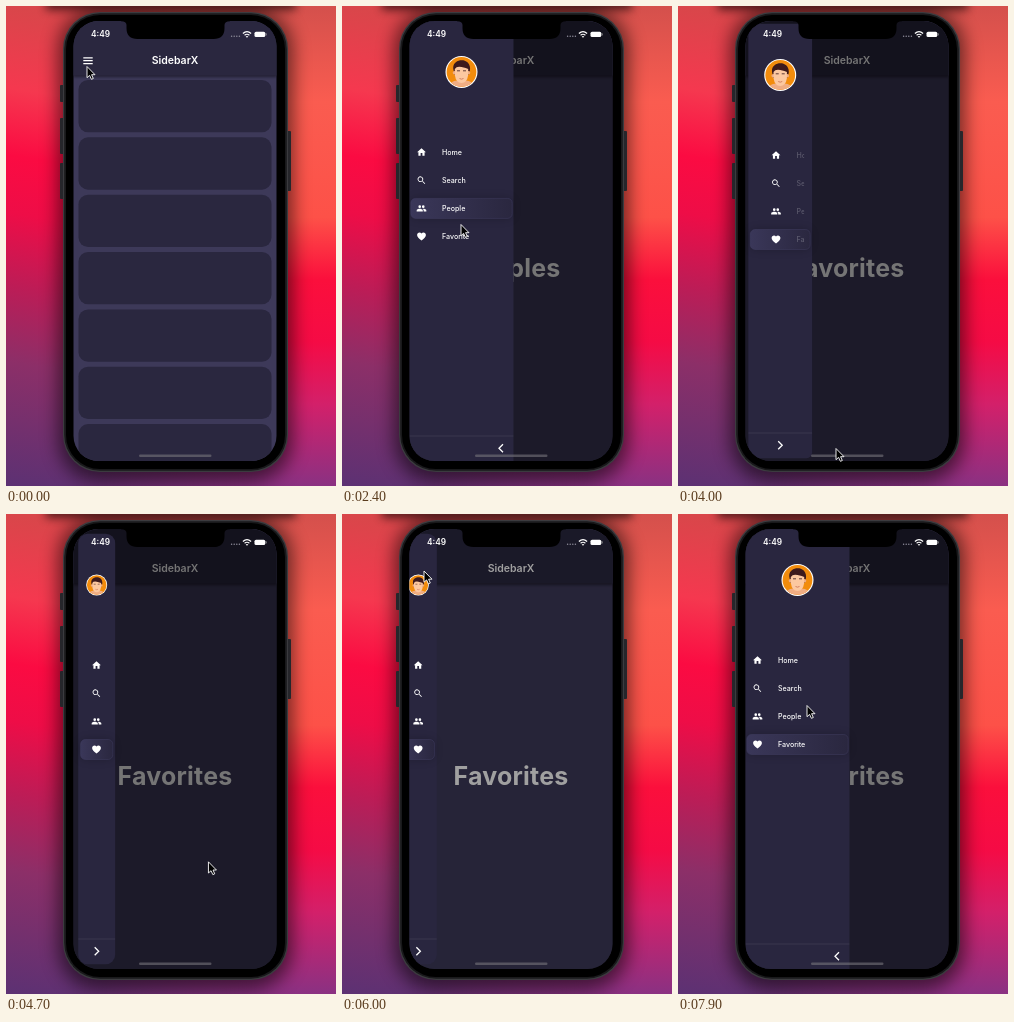
Animation, 330 px wide and 480 px high, one loop 8 s. Source, as an HTML page:

```html
<!DOCTYPE html>
<html lang="en">
<head>
<meta charset="utf-8">
<title>Sidebar demo</title>
<style>
html, body { margin: 0; width: 100%; height: 100%; overflow: hidden; background: #000; }
svg { display: block; width: 100vw; height: 100vh; }
text { font-family: Inter, Roboto, sans-serif; fill: #fff; }
</style>
</head>
<body>
<svg id="stage" viewBox="0 0 330 480">
  <defs>
    <linearGradient id="wallLeft" gradientUnits="userSpaceOnUse" x1="0" y1="0" x2="-70" y2="470">
      <stop offset="0" stop-color="#d9464a"/><stop offset=".17" stop-color="#f5384f"/>
      <stop offset=".31" stop-color="#fb0b42"/><stop offset=".43" stop-color="#ee0d47"/>
      <stop offset=".58" stop-color="#bd1c56"/><stop offset=".74" stop-color="#8c2f68"/>
      <stop offset="1" stop-color="#5c3173"/>
    </linearGradient>
    <linearGradient id="wallRight" x1="0" y1="0" x2="0" y2="1">
      <stop offset="0" stop-color="#d4504c"/><stop offset=".2" stop-color="#fa5c50"/>
      <stop offset=".44" stop-color="#fd5148"/><stop offset=".57" stop-color="#fb0f3c"/>
      <stop offset=".7" stop-color="#f50b45"/><stop offset=".83" stop-color="#d3206a"/>
      <stop offset="1" stop-color="#8a3182"/>
    </linearGradient>
    <linearGradient id="across"><stop offset=".2" stop-color="#000"/><stop offset=".8" stop-color="#fff"/></linearGradient>
    <mask id="rightSide"><rect width="330" height="480" fill="url(#across)"/></mask>
    <linearGradient id="selected"><stop offset="0" stop-color="#3a3759"/><stop offset="1" stop-color="#2a273f"/></linearGradient>
    <filter id="blur" x="-30%" y="-30%" width="160%" height="160%"><feGaussianBlur stdDeviation="9"/></filter>
    <filter id="soft" x="-30%" y="-100%" width="160%" height="300%"><feGaussianBlur stdDeviation="5"/></filter>
    <filter id="barBlur" x="-10%" y="-20%" width="120%" height="150%"><feGaussianBlur stdDeviation="1.5"/></filter>
    <clipPath id="screen"><rect x="67.5" y="15" width="203" height="440" rx="25"/></clipPath>
    <clipPath id="labelClip"><rect id="labelBox" x="60" y="100" height="200"/></clipPath>
    <clipPath id="face"><circle r="14.8"/></clipPath>
  </defs>

  <rect width="330" height="480" fill="url(#wallLeft)"/>
  <rect width="330" height="480" fill="url(#wallRight)" mask="url(#rightSide)"/>
  <rect x="52" y="2" width="235" height="474" rx="42" opacity=".55" filter="url(#blur)"/>
  <rect x="40" y="-14" width="250" height="18" opacity=".6" filter="url(#soft)"/>

  <g id="buttons" fill="#26262b"></g>
  <rect x="57" y="6" width="225" height="460" rx="37" fill="#3b3b3f"/>
  <rect x="58.2" y="7.2" width="222.6" height="457.6" rx="36" fill="#19191b"/>
  <rect x="60" y="9" width="219" height="454" rx="34"/>

  <g clip-path="url(#screen)">
    <rect x="67" y="15" width="204" height="441" fill="#3d3959"/>
    <g id="cards" fill="#2a273f"></g>
    <text id="page" x="169" y="271" font-size="25" font-weight="700" letter-spacing=".2" text-anchor="middle"></text>
    <rect x="67" y="20" width="204" height="51" opacity=".45" filter="url(#barBlur)"/>
    <rect x="67" y="15" width="204" height="54.5" fill="#2a273f"/>
    <path d="M77.3 51.8h9.4M77.3 54.7h9.4M77.3 57.6h9.4" stroke="#fff" stroke-width="1.2"/>
    <text x="169" y="58.4" font-size="10.5" font-weight="600" text-anchor="middle">SidebarX</text>
    <rect id="scrim" x="67" y="15" width="204" height="441"/>

    <g id="drawer">
      <rect id="panel" fill="#29263f"/>
      <g id="avatar">
        <circle r="16" fill="#fff"/>
        <circle r="14.9" fill="#f28c0c"/>
        <g clip-path="url(#face)">
          <path d="M-13 16Q-12 9-4 8.5V4H4V8.5Q12 9 13 16Z" fill="#f0ad83"/>
          <path d="M-8-2C-11-14 10-16 8.5-2L7 3H-7Z" fill="#3d1a1c"/>
          <circle cx="-7" cy=".8" r="1.8" fill="#f0ad83"/><circle cx="7" cy=".8" r="1.8" fill="#f0ad83"/>
          <path d="M-6.7-3Q-5-6 0-5T6.7-3V3Q5.5 11 0 11T-6.7 3Z" fill="#fcc8a0"/>
          <path d="M-4.5-1.2h3M1.5-1.2h3" stroke="#3d1a1c" stroke-width=".8"/>
          <path d="M-2 6.5Q0 7.8 2 6.5" stroke="#c66f55" stroke-width=".8" fill="none"/>
        </g>
      </g>
      <rect id="glow" height="20" rx="5" opacity=".22" filter="url(#soft)"/>
      <rect id="pick" height="20" rx="4.7" fill="url(#selected)" stroke="#47436b" stroke-opacity=".65" stroke-width=".6"/>
      <g id="icons" fill="#fff"></g>
      <g clip-path="url(#labelClip)"><g id="labels" font-size="7.1" font-weight="500"></g></g>
      <path id="rule" stroke="#fff" stroke-opacity=".12" stroke-width=".6"/>
      <path id="chevron" fill="none" stroke="#fff" stroke-width="1.3"/>
    </g>

    <rect x="133" y="448.5" width="72.5" height="2.4" rx="1.2" fill="#77757c" opacity=".6"/>
    <text x="85" y="31" font-size="8.3" font-weight="600">4:49</text>
    <path d="M225.6 30.2h9" stroke="#8c8a98" stroke-width="1.5" stroke-linecap="round" stroke-dasharray="0 2.6"/>
    <g fill="none" stroke="#fff" stroke-width="1.2">
      <path d="M236.9 27.5Q241 23.8 245.1 27.5M238.6 29.3Q241 27.2 243.4 29.3"/>
    </g>
    <path d="M239.7 30.5Q241 29.5 242.3 30.5L241 31.8Z" fill="#fff"/>
    <rect x="248.5" y="25.7" width="10.8" height="5.4" rx="1.6" fill="#fff"/>
    <path d="M260.2 27.4v2" stroke="#aaa" stroke-width=".8"/>
  </g>
  <path d="M115 14H224V15.2Q218.5 15.2 218.5 19V22Q218.5 33 207.5 33H131.5Q120.5 33 120.5 22V19Q120.5 15.2 115 15.2Z"/>
  <path id="cursor" d="M0 0V11.2L2.6 8.9 4.4 12.8 6.3 12 4.6 8.2H8Z" fill="#000" stroke="#fff" stroke-width=".9" stroke-linejoin="round"/>
</svg>
<script>
const LOOP = 8000, STEP = 100;
const $ = id => document.getElementById(id);
const set = (el, attrs) => { for (const k in attrs) el.setAttribute(k, attrs[k]); return el; };
const add = (parent, tag, attrs) =>
  parent.appendChild(set(document.createElementNS('http://www.w3.org/2000/svg', tag), attrs));
const ramp = (t, start, length) => Math.min(1, Math.max(0, (t - start) / length));
const smooth = u => u * u * (3 - 2 * u);
const mix = (a, b, u) => a + (b - a) * u;

const items = [
  { label: 'Home', icon: 'M10 20v-6h4v6h5v-8h3L12 3 2 12h3v8z' },
  { label: 'Search', icon: 'M15.5 14h-.79l-.28-.27A6.5 6.5 0 1 0 13.73 14.43l.27.28v.79l5 4.99L20.49 19zM9.5 14a4.5 4.5 0 1 1 0-9 4.5 4.5 0 0 1 0 9z' },
  { label: 'People', icon: 'M8 11a3 3 0 1 0 0-6 3 3 0 0 0 0 6zm8 0a3 3 0 1 0 0-6 3 3 0 0 0 0 6zM8 13c-2.3 0-7 1.2-7 3.5V19h14v-2.5C15 14.2 10.3 13 8 13zm8 0l-1 .1c1.2.8 2 2 2 3.4V19h6v-2.5c0-2.3-4.7-3.5-7-3.5z' },
  { label: 'Favorite', icon: 'M12 21.35l-1.45-1.32C5.4 15.36 2 12.28 2 8.5 2 5.42 4.42 3 7.5 3c1.74 0 3.41.81 4.5 2.09C13.09 3.81 14.76 3 16.5 3 19.58 3 22 5.42 22 8.5c0 3.78-3.4 6.86-8.55 11.54z' }
];
const pages = ['', 'Search', 'Peoples', 'Favorites'];
const picks = [1550, 2050, 2600];

// time, x, y of the pointer tip
const track = [
  [0, 81, 60.5], [600, 81, 60.5], [1100, 110, 132.5], [1500, 113, 173], [1650, 113, 173],
  [2000, 116, 201], [2150, 116, 201], [2400, 119, 218.5], [2550, 120, 228], [2750, 120, 228],
  [3600, 158, 442.5], [4200, 158, 442.5], [5000, 223, 304], [5300, 223, 304],
  [5750, 82, 57], [6000, 82, 57], [6650, 164, 439], [6750, 164, 439],
  [6950, 92, 436], [7250, 92, 436], [7900, 129, 191.5], [8000, 129, 191.5]
];

for (const [x, y, h] of [[54, 79, 17], [54, 112, 36], [54, 157, 36], [281, 125, 60]])
  add($('buttons'), 'rect', { x, y, width: 4, height: h, rx: 1 });
for (let i = 0; i < 7; i++)
  add($('cards'), 'rect', { x: 72.5, y: 74 + 57.35 * i, width: 193, height: 52.3, rx: 9.5 });
for (const item of items) {
  item.iconEl = add($('icons'), 'path', { d: item.icon });
  item.labelEl = add($('labels'), 'text', {});
  item.labelEl.textContent = item.label;
}

function pointer(t) {
  const i = track.findIndex(k => k[0] > t);
  const [t0, x0, y0] = track[i - 1], [t1, x1, y1] = track[i];
  const u = smooth((t - t0) / (t1 - t0));
  return `translate(${mix(x0, x1, u)} ${mix(y0, y1, u)})`;
}

function drawDrawer(fold, open, current, collapsed) {
  const margin = 4.7 * fold;
  const left = 67.5 + margin, width = mix(104, 37, fold), top = 15 + margin;
  const center = left + width / 2, drop = 5 * fold, inset = 1.3 + 1.1 * fold;
  set($('drawer'), {
    transform: `translate(${(open - 1) * (width + 2 * margin)} 0)`,
    visibility: open > 0 ? 'visible' : 'hidden'
  });
  set($('panel'), { x: left, y: top, width, height: 440 - 2 * margin, rx: 9.5 * fold });
  const radius = Math.min(16, (width - 16) / 2);
  set($('avatar'), { transform: `translate(${center} ${66 + drop}) scale(${radius / 16})` });

  const box = { x: left + inset, y: 136.2 + drop + 28.1 * current, width: width - 2 * inset };
  set($('pick'), box);
  set($('glow'), box);
  set($('labelBox'), { width: left + width - 8 - 60 });
  // Icons swing past the center while the labels give up their room.
  const iconX = 79.5 + 60.6 * fold - 49.6 * fold * fold;
  items.forEach((item, i) => {
    const y = 146.2 + drop + 28.1 * i;
    set(item.iconEl, { transform: `translate(${iconX} ${y}) scale(.44) translate(-12 -12)` });
    set(item.labelEl, { x: iconX + 20.5, y: y + 2.5, opacity: (1 - fold) ** 1.6 });
  });

  const ruleY = 430 - drop, chevY = 442.3 - drop;
  set($('rule'), { d: `M${left} ${ruleY}h${width}` });
  const chevX = collapsed ? center : left + width - 12.5, side = collapsed ? 1 : -1;
  set($('chevron'), { d: `M${chevX - 2 * side} ${chevY - 4}l${4 * side} 4l${-4 * side} 4` });
}

function draw(t) {
  const open = ramp(t, 380, 246) - ramp(t, 5085, 246) + ramp(t, 5830, 246);
  const fold = ramp(t, 3820, 300) - ramp(t, 7010, 300);
  const current = picks.filter(p => t >= p).length;
  set($('cards'), { visibility: current ? 'hidden' : 'visible' });
  $('page').textContent = pages[current];
  set($('scrim'), { opacity: .54 * open });
  drawDrawer(fold, open, current, t >= 3820 && t < 7010);
  set($('cursor'), { transform: pointer(t) });
}

const start = performance.now();
function tick(now) {
  const t = Math.max(0, now - start) % LOOP;
  draw(Math.floor(t / STEP) * STEP);
  requestAnimationFrame(tick);
}
draw(0);
requestAnimationFrame(tick);
</script>
</body>
</html>
```
